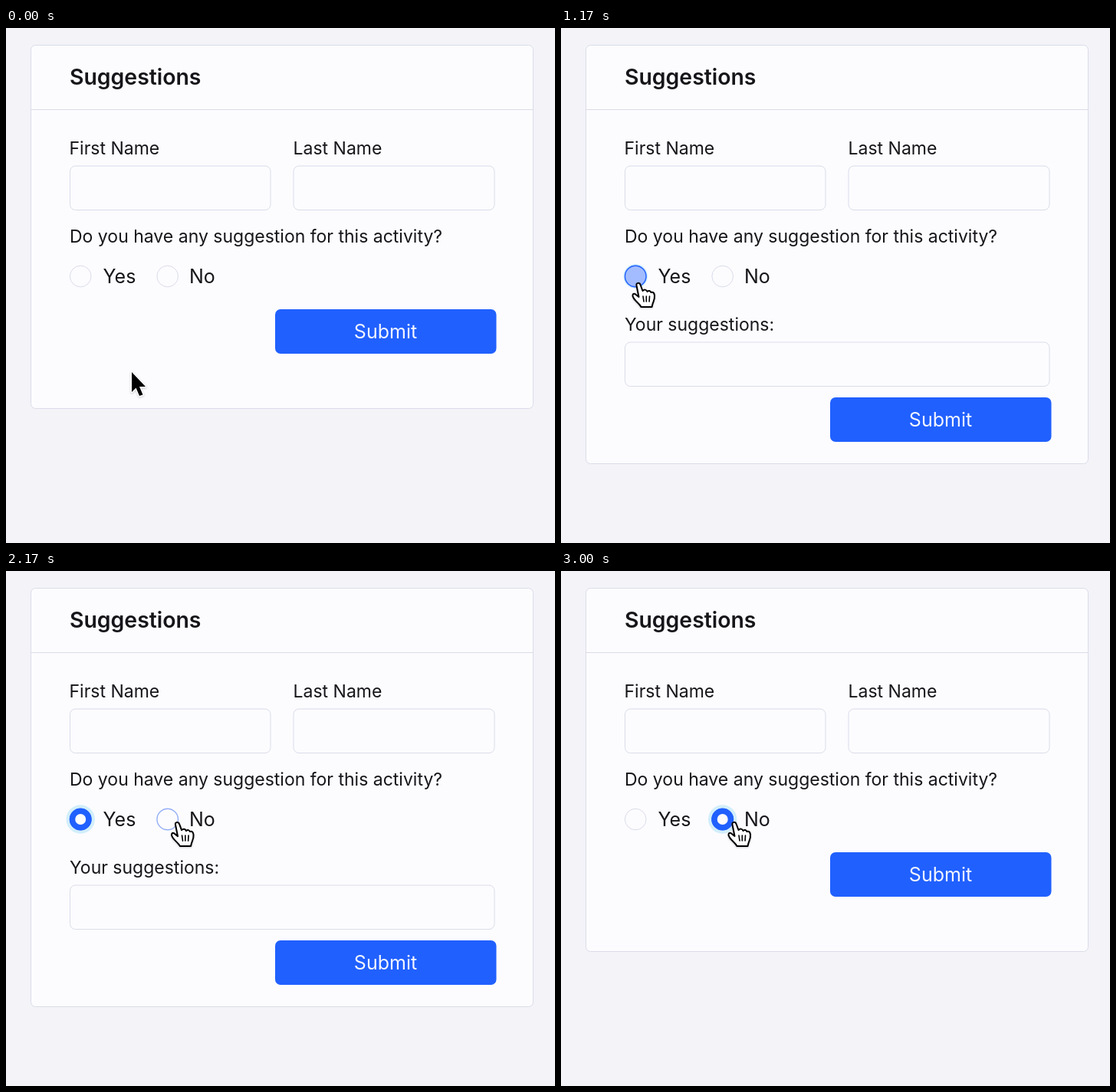
An HTML page that plays this animation: 716x672 px, repeating every 3.83 s.

```html
<!DOCTYPE html>
<html lang="en">
<head>
<meta charset="utf-8">
<title>Suggestions form</title>
<style>
  html, body { margin: 0; width: 100%; height: 100%; overflow: hidden; background: #f3f3f8; }
  svg { display: block; }
  text { font: 23px Inter, Roboto, sans-serif; fill: #16161a; }
  .title { font-size: 28.4px; font-weight: 600; }
  .big { font-size: 25px; }
  .box { fill: #fcfcff; stroke: #dadce8; }
  .halo { fill: #d2eefa; }
  .rim { fill: none; stroke: #2463ff; stroke-width: 1.4; }
  .disc { fill: #2060ff; }
  .dot { fill: #fcfcff; }
  #arrow, #hand { filter: drop-shadow(0 1.5px 1px #80808866); }
</style>
</head>
<body>
<svg width="716" height="672" viewBox="0 0 716 672">
  <rect id="card" class="box" x="32.5" y="22.5" width="655" height="474" rx="6"/>
  <path class="box" d="M33 106.5H687"/>
  <text class="title" x="83" y="74">Suggestions</text>
  <text x="82.5" y="165">First Name</text>
  <text x="374.5" y="165">Last Name</text>
  <rect class="box" x="83.5" y="180" width="261.5" height="57.5" rx="7"/>
  <rect class="box" x="375" y="180" width="262" height="57.5" rx="7"/>
  <text x="83" y="280">Do you have any suggestion for this activity?</text>
  <g id="yes" transform="translate(97.2 324)"></g>
  <g id="no" transform="translate(210.7 324)"></g>
  <text class="big" x="126.5" y="333">Yes</text>
  <text class="big" x="239" y="333">No</text>
  <g id="extra">
    <text x="83" y="395">Your suggestions:</text>
    <rect class="box" x="83.5" y="410" width="553.5" height="57.5" rx="7"/>
  </g>
  <g id="submit">
    <rect x="351" y="367" width="288.5" height="58" rx="7" fill="#2060ff"/>
    <text class="big" x="495" y="405" text-anchor="middle" style="fill:#f4f6ff">Submit</text>
  </g>
  <path id="arrow" d="M0 0V26L5.5 20.5L10 31L14.5 29.5L10 19H18Z"
    stroke="#fff" stroke-width="3" paint-order="stroke" stroke-linejoin="round"/>
  <g id="hand" fill="#fff" stroke="#000" stroke-width="2" stroke-linejoin="round" stroke-linecap="round">
    <path d="M6 4C5 0 10 0 11 3L14 11C16 9 19 9 20 12C22 10 24 11 25 13
      C28 12 29 14 29.5 17C30 22 28 25 27 28L26 32H12C10 28 4 24 2 20C0 17 1 14 4 15L9 19Z"/>
    <path d="M14.5 18L15.5 25M18.8 18V25M23 18L22.6 25" stroke-width="1.6"/>
  </g>
</svg>
<script>
const $ = id => document.getElementById(id);
const LOOP = 3830, DURATION = 410;
const START = { reach: 340, hoverYes: 590, checkYes: 1090, cross: 1840, hoverNo: 2090, checkNo: 2590 };

// The picture refreshes twice, 80 ms apart, every 250 ms.
function snap(t) {
  const since = t - 420;
  if (since < 0) return 0;
  const phase = since % 250;
  return t - phase + (phase < 80 ? 0 : 80);
}

const clamp = v => Math.min(1, Math.max(0, v));
const ease = (t, start) => 1 - (1 - clamp((t - start) / DURATION)) ** 2.4;
const mix = (a, b, p) => a + (b - a) * p;

for (const id of ["yes", "no"]) {
  $(id).innerHTML = `<circle class="halo"/><circle class="box" r="13.8"/>
    <circle class="rim" r="13.8"/><circle class="disc" r="14.3"/><circle class="dot"/>`;
}

function drawRadio(id, hover, check, leave) {
  const [halo, , rim, disc, dot] = $(id).children;
  halo.setAttribute("r", check && !leave ? mix(14, 18.7, check) : 0);
  rim.setAttribute("opacity", hover * (1 - leave));
  disc.setAttribute("opacity", check * (1 - leave));
  dot.setAttribute("r", 7 * clamp((check - .45) / .55));
}

function place(id, x, y) {
  $(id).setAttribute("transform", `translate(${x} ${y})`);
}

function show(id, visible) {
  $(id).style.display = visible ? "" : "none";
}

function draw() {
  const t = snap(performance.now() % LOOP);
  const p = {};
  for (const name in START) p[name] = ease(t, START[name]);

  const open = p.checkYes > 0 && p.checkNo === 0;
  $("card").setAttribute("height", open ? 546 : 474);
  show("extra", open);
  place("submit", 0, open ? 115 : 0);

  drawRadio("yes", p.hoverYes, p.checkYes, p.checkNo);
  drawRadio("no", p.hoverNo, p.checkNo, 0);

  const pointing = p.hoverYes > 0;
  show("arrow", !pointing);
  show("hand", pointing);
  place("arrow", mix(164, 88, p.reach), mix(449, 339, p.reach));
  place("hand", mix(92.5, 217.5, p.cross), mix(332, 327, p.cross));
  requestAnimationFrame(draw);
}
draw();
</script>
</body>
</html>
```
